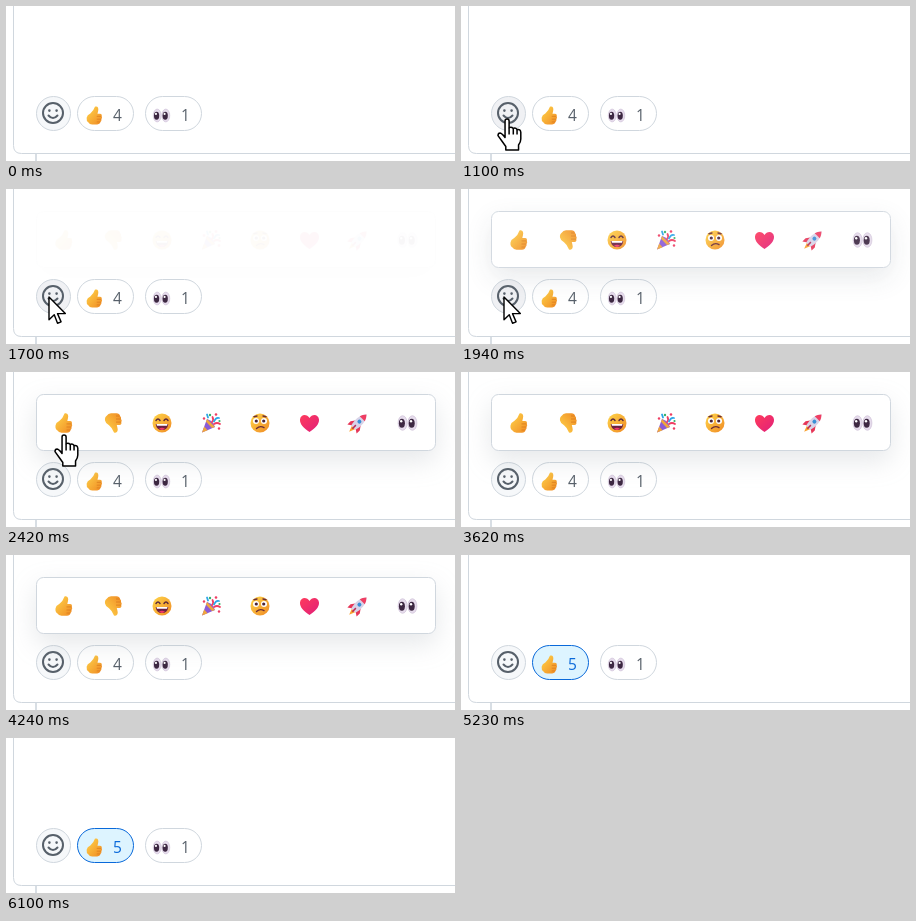
An HTML page that plays this animation: 449x155 px, repeating every 6350 ms.

```html
<!DOCTYPE html>
<html lang="en">
<head>
<meta charset="utf-8">
<title>Adding a reaction</title>
<style>
  html, body { margin: 0; width: 100%; height: 100%; overflow: hidden; background: #fff; }
  svg { display: block; width: 449px; height: 155px; }
  text { font: 15.5px "Open Sans", "Noto Sans", sans-serif; fill: #57606a; }
  .line { fill: #fff; stroke: #d0d7de; }
  #popup > .line { filter: drop-shadow(0 10px 13px rgba(140, 149, 159, .22)); }
  .chosen rect { fill: #ddf4ff; stroke: #0969da; }
  .chosen text { fill: #0969da; }
  .pointer { fill: #fff; stroke: #000; stroke-linejoin: round; }
</style>
</head>
<body>
<svg viewBox="0 0 449 155">
  <defs>
    <linearGradient id="gold" x2="1" y2="1">
      <stop stop-color="#ffd64a"/><stop offset="1" stop-color="#f08a24"/>
    </linearGradient>
    <linearGradient id="pink" x2="1" y2="1">
      <stop stop-color="#ff3b5c"/><stop offset="1" stop-color="#e0207a"/>
    </linearGradient>
    <g id="thumb">
      <path fill="url(#gold)" d="M1-9.5C4-10.5 5.3-8 4.5-5L3.8-2H6.5Q9-1.6 8.3.7 9.3 2.4 8 4 8.5 6 7 7 6.5 9.7 3.5 9.7H-2Q-5 9.5-6 7.5-8.5 6-8 2.5-7.5-.5-4-2.2-.5-5 1-9.5Z"/>
      <path fill="none" stroke="#d97a1c" stroke-width=".8" d="M8 .9H3M7.8 4H3M6.8 7H3"/>
    </g>
    <g id="grin">
      <circle r="9.5" fill="url(#gold)"/>
      <path fill="none" stroke="#5c2b3c" stroke-width="1.5" stroke-linecap="round" d="M-6-2.5Q-4-5.5-2-2.5M2-2.5Q4-5.5 6-2.5"/>
      <path fill="#6b2140" d="M-6.3 1H6.3Q5.5 7 0 7T-6.3 1Z"/>
      <path fill="#fff" d="M-5.5 1H5.5L5 2.8H-5Z"/>
      <path fill="#f5376b" d="M-3 5.8Q0 3.8 3 5.8 0 8-3 5.8Z"/>
    </g>
    <g id="party">
      <path fill="#8a5bd6" d="M-9 9.5-4-4Q2-2 4 4Z"/>
      <path fill="#f0a63c" d="M-9 9.5-6.8 3.6-3.4 7.2ZM-5-1.2-4-4 4 4 1 5Z"/>
      <path fill="none" stroke-width="1.8" stroke-linecap="round" stroke="#ef3e63" d="M1-1Q3-3 1.5-6M3 1Q6-1 9 1"/>
      <path fill="none" stroke-width="1.8" stroke-linecap="round" stroke="#2aa5e8" d="M3-1.5Q5-6 8-5M-3-5.5-4-8.5"/>
      <g fill="#ef3e63"><circle cx="5" cy="-8.5" r="1.3"/><circle cx="-7" cy="-4.5" r="1.2"/><circle cx="8" cy="5.5" r="1.2"/></g>
      <g fill="#35b36b"><circle cx="-1" cy="-8" r="1.2"/><circle cx="8.5" cy="-2" r="1.1"/></g>
    </g>
    <g id="confused">
      <circle r="9.5" fill="url(#gold)"/>
      <g fill="#fff"><circle cx="-4" cy="-2" r="3"/><circle cx="4" cy="-2" r="3"/></g>
      <g fill="#4a2438"><circle cx="-3.7" cy="-2" r="1.6"/><circle cx="3.7" cy="-2" r="1.6"/></g>
      <path fill="none" stroke="#6b2c37" stroke-width="1.4" stroke-linecap="round" d="M-3.5 5.5Q0 2.3 4 4.6M-6-6.3-3-7M6-6.3 3-7"/>
    </g>
    <path id="heart" fill="url(#pink)" d="M0 9C-6 5-9.8 1-9.5-3.5-9-9-2.5-9.5 0-5 2.5-9.5 9-9 9.5-3.5 9.8 1 6 5 0 9Z"/>
    <g id="rocket" transform="rotate(45)">
      <path fill="#f9a12e" d="M-2.5 6H2.5L0 12.5Z"/>
      <path fill="#e63658" d="M-3-1-6.5 4V8.5L-2 5.5ZM3-1 6.5 4V8.5L2 5.5Z"/>
      <path fill="#d8d3e8" d="M0-12C5-7 4.5 1 3 6.5H-3C-4.5 1-5-7 0-12Z"/>
      <path fill="#ef3e63" d="M0-12Q3-9 3.6-6H-3.6Q-3-9 0-12Z"/>
      <circle cy="-2" r="2" fill="#3b8fd6"/>
      <path stroke="#b82a55" stroke-width="1.5" d="M0 3V8"/>
    </g>
    <g id="eyes">
      <g fill="#e6dcec" stroke="#c8b9d2" stroke-width=".6"><ellipse cx="-4.9" rx="4.5" ry="7.3"/><ellipse cx="4.9" rx="4.5" ry="7.3"/></g>
      <g fill="#3d2842"><ellipse cx="-5.6" cy=".3" rx="3" ry="4.5"/><ellipse cx="4.2" cy=".3" rx="3" ry="4.5"/></g>
      <g fill="#fff"><circle cx="-6.3" cy="-1.8" r="1.2"/><circle cx="3.5" cy="-1.8" r="1.2"/></g>
    </g>
  </defs>

  <path class="line" d="M7.5-5V139.500Q7.500 147.500 15.500 147.500H455V-5"/>
  <path stroke="#d8dee4" stroke-width="2" d="M30 148V155"/>

  <circle id="smiley" class="line" cx="47.500" cy="107.500" r="17"/>
  <g transform="translate(47 107)" fill="none" stroke="#57606a" stroke-width="2" stroke-linecap="round">
    <circle r="10"/>
    <path d="M-4.500 2.500Q0 7.500 4.500 2.500"/>
    <path stroke-width="2.600" d="M-3.600-2.500v.1M3.600-2.500v.1"/>
  </g>

  <g id="votes">
    <rect class="line" x="71.500" y="90.500" width="56" height="34" rx="17"/>
    <use href="#thumb" transform="translate(88 109.500) scale(.92)"/>
    <text id="count" x="107" y="115">4</text>
  </g>
  <rect class="line" x="139.500" y="90.500" width="56" height="34" rx="17"/>
  <use href="#eyes" transform="translate(155.500 109.500) scale(.88)"/>
  <text x="175" y="115">1</text>

  <g id="popup">
    <rect class="line" x="30.500" y="22.500" width="399" height="56" rx="7"/>
    <rect id="hover" x="36" y="28" width="44" height="45" rx="7" fill="#f3f4f6"/>
    <use href="#thumb" x="57.500" y="51"/>
    <use href="#thumb" transform="translate(107 51) scale(1 -1)"/>
    <use href="#grin" x="156" y="51"/>
    <use href="#party" x="205" y="51"/>
    <use href="#confused" x="254" y="51"/>
    <use href="#heart" x="303.500" y="51"/>
    <use href="#rocket" x="352" y="51"/>
    <use href="#eyes" x="401.500" y="51"/>
  </g>

  <g id="cursor" class="pointer">
    <g id="hand" transform="scale(1.5) translate(-6.800 -.7)">
      <path d="M5.500 13V2Q5.500.7 6.800.7 8.200.7 8.200 2V6.500Q9.700 5.700 11 7 12.500 6.300 13.500 7.700 15.800 7.300 16 9.500V14Q16 16 14.500 18V21.300H6V19L3.500 15.500.8 11.800Q.8 10 2.200 10 3.500 10.200 5.500 13Z"/>
      <path d="M8.200 6.500V11M11 7V11M13.500 7.700V11"/>
    </g>
    <path id="arrow" transform="scale(1.420)" d="M0 0V16L3.700 12.500 6 18.500 8.500 17.500 6 11.700H11.500Z"/>
  </g>
</svg>
<script>
const LOOP = 6350, START = 740, STEP = 120;
const el = id => document.getElementById(id);
const show = (id, on) => el(id).style.display = on ? "" : "none";

// Each key: time, then values
const path = [
  [740, 150, 147], [860, 112, 136], [980, 70, 122], [1100, 46, 113], [1340, 43, 108],
  [2060, 43, 108], [2180, 47, 98], [2420, 58, 63], [2780, 60, 50], [3020, 61, 47],
  [3140, 62, 41], [3500, 68, -40]
];
const fade = [[1580, 0], [1700, .03], [1820, .5], [1940, .9], [2060, 1]];

function at(keys, t) {
  const next = keys.findIndex(key => key[0] > t);
  if (next < 0) return keys.at(-1).slice(1);
  if (next === 0) return keys[0].slice(1);
  const a = keys[next - 1], b = keys[next];
  const part = (t - a[0]) / (b[0] - a[0]);
  return a.slice(1).map((v, i) => v + (b[i + 1] - v) * part);
}

function draw(now) {
  const time = now % LOOP;
  const t = time < START ? 0 : START + Math.floor((time - START) / STEP) * STEP;
  const done = t >= 4240;
  const pointing = t < 1460 || t >= 2180;

  el("cursor").setAttribute("transform", `translate(${at(path, t)})`);
  show("cursor", t >= START && t < 3500);
  show("hand", pointing);
  show("arrow", !pointing);

  el("smiley").style.fill = t >= 1100 && t < 2180 ? "#f0f1f4" : "#f6f8fa";
  el("popup").style.opacity = at(fade, t)[0];
  show("popup", t >= 1700 && !done);
  show("hover", t >= 2540 && t < 3260);

  el("votes").classList.toggle("chosen", done);
  el("count").textContent = done ? 5 : 4;
  requestAnimationFrame(() => draw(performance.now() - begin));
}

const begin = performance.now();
draw(0);
</script>
</body>
</html>
```
